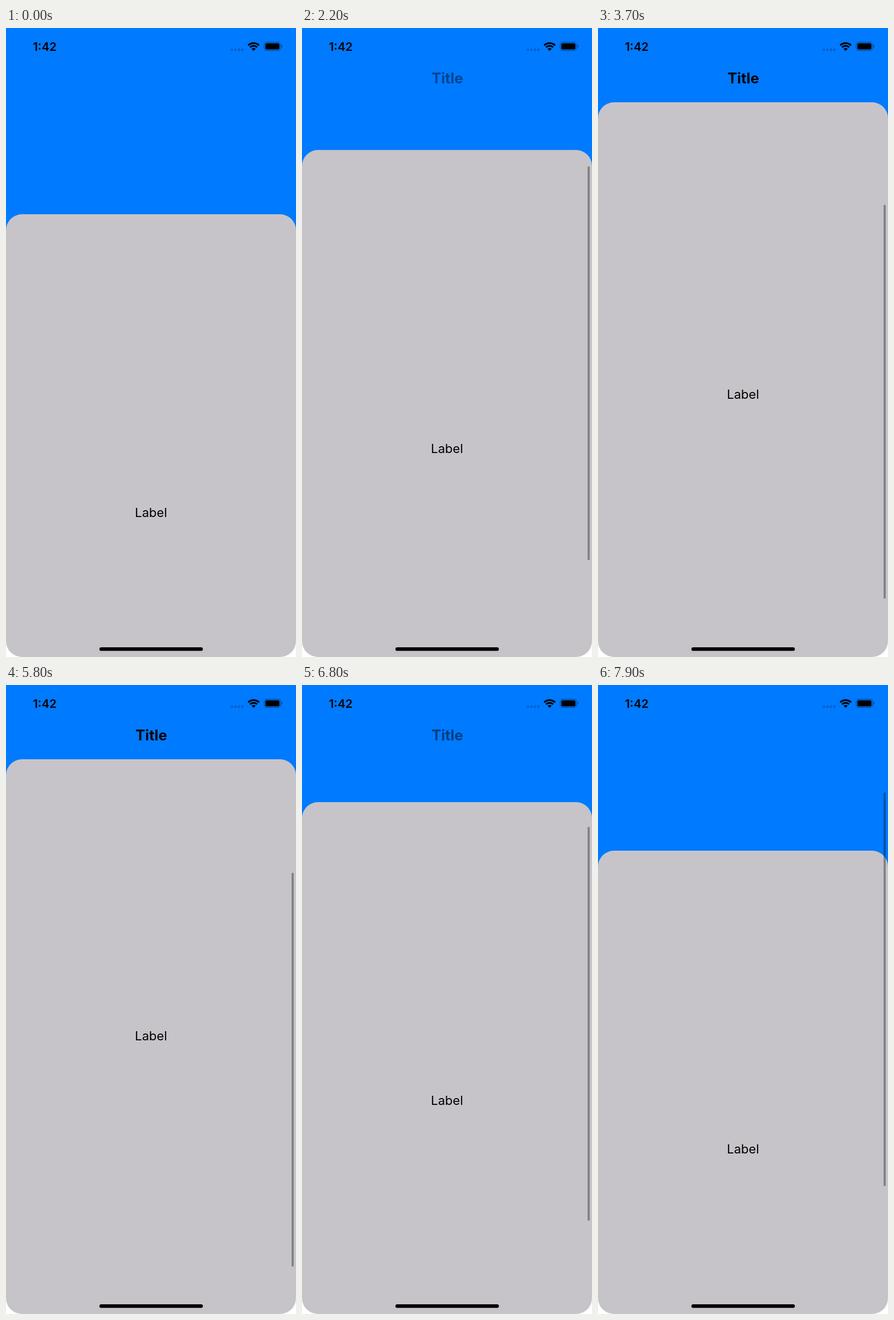
An HTML page with a canvas that plays this animation: 509x1101 px, repeating every 8 s.

```html
<!DOCTYPE html>
<html lang="en">
<head>
<meta charset="utf-8">
<title>Collapsing header</title>
<style>
  html, body { margin: 0; width: 100%; height: 100%; overflow: hidden; background: #fff; }
  canvas { display: block; width: 509px; height: 1101px; }
</style>
</head>
<body>
<canvas id="stage"></canvas>
<script>
const W = 509, H = 1101, LOOP = 8000, STEP = 100;
const BLUE = '#007aff', SHEET = '#c6c4c8';
const SHEET_TOP = 326, SHEET_MIN = 130, LABEL_Y = 856;

// Drag path: [time in ms, scroll offset in px]
const DRAG = [
  [1200, 0], [1300, 8], [1600, 48], [2900, 172], [3000, 177], [3700, 207],
  [3900, 212.5], [4400, 235], [5700, 235], [5800, 234], [6600, 142],
  [6800, 121], [7500, 59], [7900, 36]
];

const canvas = document.getElementById('stage');
const ctx = canvas.getContext('2d');
const dpr = window.devicePixelRatio || 1;
canvas.width = W * dpr;
canvas.height = H * dpr;
ctx.scale(dpr, dpr);

const clamp = (v, lo, hi) => Math.min(hi, Math.max(lo, v));
const slope = i => (DRAG[i + 1][1] - DRAG[i][1]) / (DRAG[i + 1][0] - DRAG[i][0]);

// Harmonic mean of neighbouring slopes keeps the curve monotone
function tangent(i) {
  if (i === 0) return slope(0);
  if (i === DRAG.length - 1) return slope(i - 1);
  const a = slope(i - 1), b = slope(i);
  return a * b <= 0 ? 0 : 2 * a * b / (a + b);
}

function scrollAt(t) {
  if (t <= DRAG[0][0]) return 0;
  let i = 0;
  while (i < DRAG.length - 2 && t > DRAG[i + 1][0]) i++;
  const [t0, s0] = DRAG[i], [t1, s1] = DRAG[i + 1];
  const d = t1 - t0, u = Math.min(1, (t - t0) / d), v = 1 - u;
  return s0 * (1 + 2 * u) * v * v + s1 * u * u * (3 - 2 * u)
       + d * u * v * (tangent(i) * v - tangent(i + 1) * u);
}

function box(x, y, w, h, r, fill) {
  ctx.beginPath();
  ctx.roundRect(x, y, w, h, r);
  ctx.fillStyle = fill;
  ctx.fill();
}

function text(str, x, y, size, weight, alpha = 1) {
  ctx.font = `${weight} ${size}px Inter, Roboto, sans-serif`;
  ctx.textAlign = 'center';
  ctx.textBaseline = 'alphabetic';
  ctx.fillStyle = `rgba(0,0,0,${alpha})`;
  ctx.fillText(str, x, y);
}

function wifi(x, y) {
  const from = -Math.PI * 0.75, to = -Math.PI * 0.25;
  ctx.strokeStyle = ctx.fillStyle = '#000';
  ctx.lineWidth = 3;
  for (const r of [13.6, 8.8]) {
    ctx.beginPath();
    ctx.arc(x, y, r, from, to);
    ctx.stroke();
  }
  ctx.beginPath();
  ctx.moveTo(x, y);
  ctx.arc(x, y, 5.2, from, to);
  ctx.fill();
}

function battery() {
  ctx.beginPath();
  ctx.roundRect(453.3, 24.8, 28.6, 14.6, 4.5);
  ctx.strokeStyle = 'rgba(0,0,0,.4)';
  ctx.lineWidth = 1.2;
  ctx.stroke();
  box(455.2, 26.7, 24.8, 10.8, 2.6, '#000');
  box(483.2, 29.8, 1.7, 4.8, [0, 1.7, 1.7, 0], 'rgba(0,0,0,.45)');
}

function statusBar() {
  text('1:42', 68, 40, 20.5, 600);
  for (let i = 0; i < 4; i++) box(394.4 + i * 6.1, 35.8, 4.4, 4.4, 2.2, 'rgba(0,0,0,.2)');
  wifi(434.6, 40);
  battery();
}

function draw(t) {
  const s = scrollAt(t);
  const top = Math.max(SHEET_MIN, SHEET_TOP - s);

  ctx.fillStyle = '#fff';
  ctx.fillRect(0, 0, W, H);
  ctx.fillStyle = BLUE;
  ctx.fillRect(0, 0, W, 700);

  box(0, top, W, H - top, 28, SHEET);
  text('Label', W / 2, LABEL_Y - s, 22, 400);

  const fade = clamp(1 - (top - SHEET_MIN) / 150, 0, 1);
  if (fade > 0) text('Title', W / 2 + 0.5, 96.5, 25.5, 700, fade);

  statusBar();
  if (t >= 1300) box(501.3, 162 + 0.712 * s, 3.7, 689.5, 1.85, 'rgba(0,0,0,.35)');
  box(164, 1084, 181.5, 6.3, 3.15, '#000');
}

const start = performance.now();
function frame() {
  const t = Math.max(0, performance.now() - start) % LOOP;
  draw(Math.floor(t / STEP) * STEP);
  requestAnimationFrame(frame);
}
frame();
</script>
</body>
</html>
```
